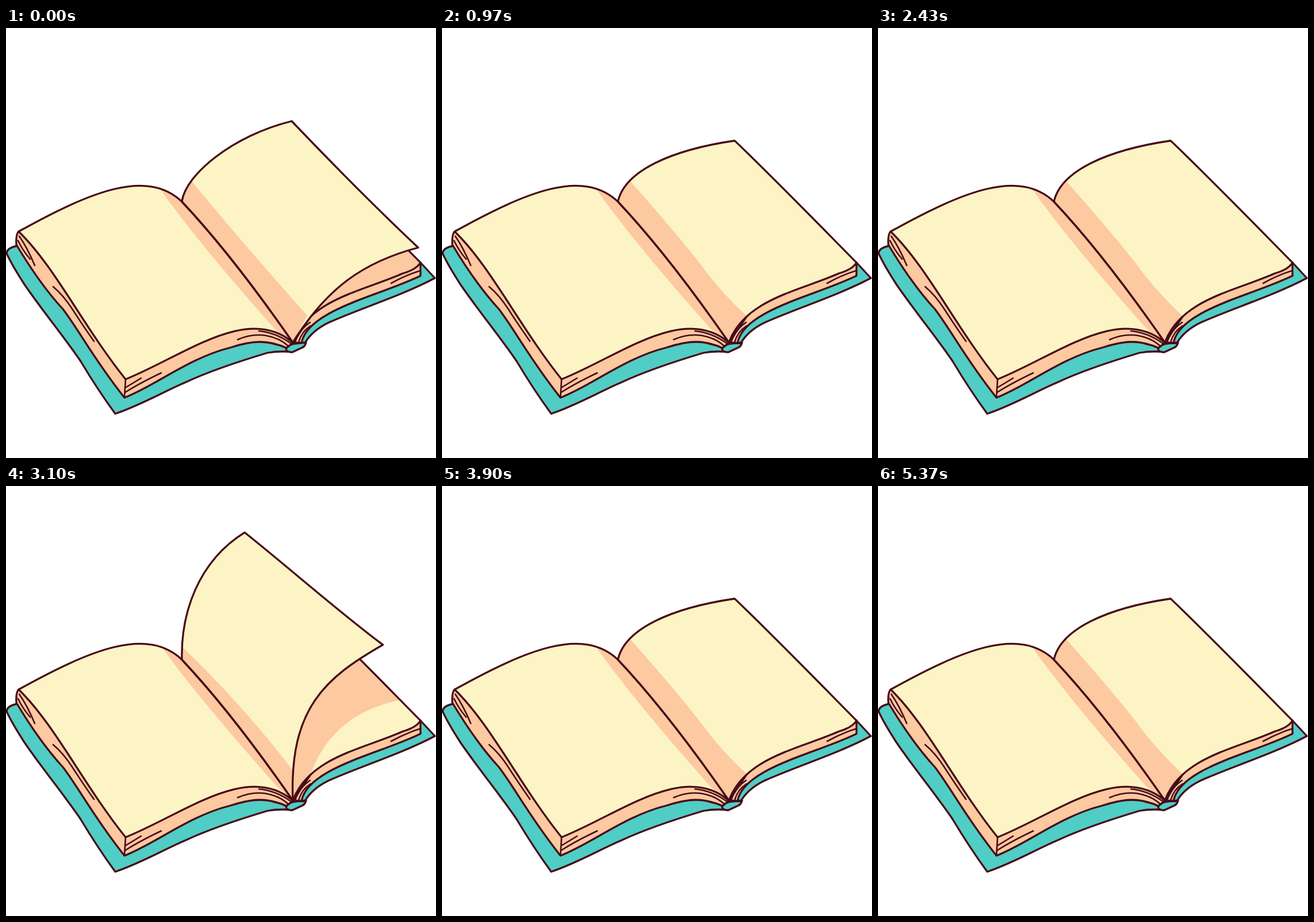
Write an HTML page that moves like this. It is 748 px wide and 748 px high and loops after 5830 ms.

```html
<!DOCTYPE html>
<html lang="en">
<head>
<meta charset="utf-8">
<title>Turning pages</title>
<style>
  html, body { margin: 0; width: 100%; height: 100%; overflow: hidden; background: #fff; }
  svg { display: block; width: 100%; height: 100%; }
  .cream { fill: #fcf4c4; }
  .peach { fill: #fdc9a0; }
  .teal { fill: #50cdc5; }
  .line { fill: none; }
  .ink { stroke: #470a18; stroke-width: 3.3; stroke-linejoin: round; stroke-linecap: round; }
  .fine { stroke-width: 2.6; }
</style>
</head>
<body>
<svg viewBox="0 0 748 748">
  <defs>
    <path id="leftPage" d="M306,302C245,245 150,283 22,354C85,415 135,520 208,611C310,570 420,480 499,547C440,462 370,370 306,302Z"/>
    <path id="rightPage" d="M306,302C318,248 400,212 509,196C576,260 648,334 721,408Q714,420 690,427C620,458 527,472 499,547C440,462 370,370 306,302Z"/>
    <clipPath id="leftClip"><use href="#leftPage"/></clipPath>
    <clipPath id="rightClip"><use href="#rightPage"/></clipPath>
    <clipPath id="turnClip"><path id="turnClipPath"/></clipPath>
  </defs>

  <!-- cover -->
  <path class="teal ink" d="M20,379Q2,382 1,392Q10,412 32,446C62,490 103,540 130,580Q160,630 190,671C235,656 275,632 313,616C360,594 425,574 455,565Q472,562 490,563L520,548Q532,527 560,513C610,490 690,465 746,435L721,408L480,400Z"/>

  <!-- page blocks -->
  <path class="peach ink" d="M22,354Q17,358 18,377C45,422 75,463 99,489C130,530 150,572 206,643C262,621 318,574 390,556C430,543 455,542 489,557L499,547L300,400Z"/>
  <path class="peach ink" d="M721,408V431C650,466 525,490 514,548L499,547L600,400Z"/>
  <path class="teal ink" d="M487,558Q493,550 503,549L522,547Q520,555 513,557L498,564Q488,564 487,558Z"/>

  <use href="#leftPage" class="cream"/>
  <path id="leftShadow" class="peach" clip-path="url(#leftClip)"/>
  <use href="#leftPage" class="line ink"/>
  <use href="#rightPage" class="cream"/>
  <path id="rightShadow" class="peach" clip-path="url(#rightClip)"/>
  <use href="#rightPage" class="line ink"/>

  <!-- sheet edges -->
  <path class="line ink fine" d="M23,362Q37,382 50,413M21,370Q29,387 42,402M82,450Q100,465 116,490T153,545M208,611L206,643M207,626Q222,617 235,609M207,634Q234,617 270,600M403,542Q428,531 452,535T492,554M440,527Q470,530 496,549M670,444Q695,430 721,422M503,546Q511,524 529,512M509,547Q514,528 530,518"/>

  <g id="turn">
    <path id="turnFill" class="cream"/>
    <path id="turnShade" class="peach" clip-path="url(#turnClip)"/>
    <path id="turnLine" class="line ink"/>
  </g>
</svg>
<script>
const LOOP = 5830, FRAME = 100 / 3, LAST = 12, STRIDE = 29 / 12;
// start of each turn and its rounding offset, in ticks
const TURNS = [[0, .92], [44, .5], [88, .2], [132, .2]];
const SPINE = "499,547C440,462 370,370 306,302Z";

const sheet = (top, edge, foot) => `M306,302C${top}C${edge}C${foot} ${SPINE}`;
const band = (rim, curve) => `M306,302L${rim}Q${curve}L${SPINE}`;

// key drawings by step; steps between them are splined
const page = {
  0: sheet("312,255 395,187 497,162", "560,228 648,317 717,382", "622,407 558,452"),
  3: sheet("300,220 305,125 356,55", "430,115 515,185 587,247", "520,320 475,390"),
  4: sheet("296,235 276,140 280,43", "345,105 405,150 483,240", "479,330 472,430"),
  6: sheet("265,245 170,180 134,108", "165,165 275,285 340,362", "410,425 440,465"),
  8: sheet("245,225 110,248 59,207", "105,285 160,340 210,412", "258,476 440,452"),
  12: sheet("245,245 150,283 22,354", "85,415 135,520 208,611", "310,570 420,480")
};
const shade = {
  0: band("300,240 314,256", "425,390 524,500"),
  3: band("300,290 300,271", "400,370 491,488"),
  4: band("297,280 296,248", "375,345 482,470"),
  6: band("220,150 130,180", "280,350 430,480"),
  8: band("306,220 205,235", "305,360 412,470"),
  12: band("306,220 257,264", "322,360 468,524")
};
const rightRest = band("300,240 318,256", "395,342 445,405Q485,460 530,501");
const rightShadow = {
  0: band("400,150 600,190", "700,280 760,400Q640,460 540,510"),
  3: band("400,150 600,190", "640,250 652,341Q548,382 527,500"),
  4: band("400,150 480,196", "530,262 577,301Q535,405 527,500"),
  6: band("300,240 334,250", "405,325 470,402Q470,450 526,502"),
  8: rightRest,
  12: rightRest
};
const leftRest = band("306,220 257,264", "322,360 468,524");
const leftShadow = {
  0: leftRest,
  4: leftRest,
  6: band("306,220 246,262", "325,385 452,526"),
  8: band("306,220 180,300", "238,510 395,534"),
  12: band("306,220 20,340", "80,590 300,570")
};

const NUMBER = /\d+(\.\d+)?/g;

function spline(times, values, t) {
  const end = times.length - 1;
  const slope = i => (values[i + 1] - values[i]) / (times[i + 1] - times[i]);
  const tangent = i => {
    if (i === end) return 0;
    if (i === 0) return 1.5 * slope(0) - .5 * tangent(1);
    const before = times[i] - times[i - 1], after = times[i + 1] - times[i];
    return (slope(i - 1) * after + slope(i) * before) / (before + after);
  };
  let i = 0;
  while (i < end - 1 && t >= times[i + 1]) i++;
  const h = times[i + 1] - times[i], u = (t - times[i]) / h, v = 1 - u;
  return values[i] * (1 + 2 * u) * v * v + values[i + 1] * (3 - 2 * u) * u * u
    + h * u * v * (tangent(i) * v - tangent(i + 1) * u);
}

function track(keys) {
  const times = Object.keys(keys).map(Number);
  const paths = Object.values(keys);
  const points = paths.map(p => p.match(NUMBER).map(Number));
  return t => {
    let n = 0;
    return paths[0].replace(NUMBER, () => {
      const values = points.map(p => p[n]);
      n++;
      return spline(times, values, t).toFixed(1);
    });
  };
}

const pageAt = track(page), shadeAt = track(shade);
const rightAt = track(rightShadow), leftAt = track(leftShadow);
const el = id => document.getElementById(id);
const setPath = (id, d) => el(id).setAttribute("d", d);

function stepAt(ms) {
  const tick = Math.floor(ms / FRAME + .2);
  const [start, offset] = TURNS.filter(turn => turn[0] <= tick).pop();
  const step = Math.ceil((tick - start + 1 - offset) / STRIDE) - 1;
  return Math.max(0, Math.min(LAST, step));
}

let shown = -1;
function draw(ms) {
  const step = stepAt(ms);
  if (step === shown) return;
  shown = step;
  const resting = step === LAST;
  const outline = pageAt(step);
  for (const id of ["turnFill", "turnLine", "turnClipPath"]) setPath(id, outline);
  setPath("turnShade", shadeAt(step));
  setPath("rightShadow", rightAt(step));
  setPath("leftShadow", leftAt(resting ? 0 : step));
  el("turn").style.display = resting ? "none" : "";
}

const begin = performance.now();
function loop() {
  draw((performance.now() - begin) % LOOP);
  requestAnimationFrame(loop);
}
draw(0);
requestAnimationFrame(loop);
</script>
</body>
</html>
```
